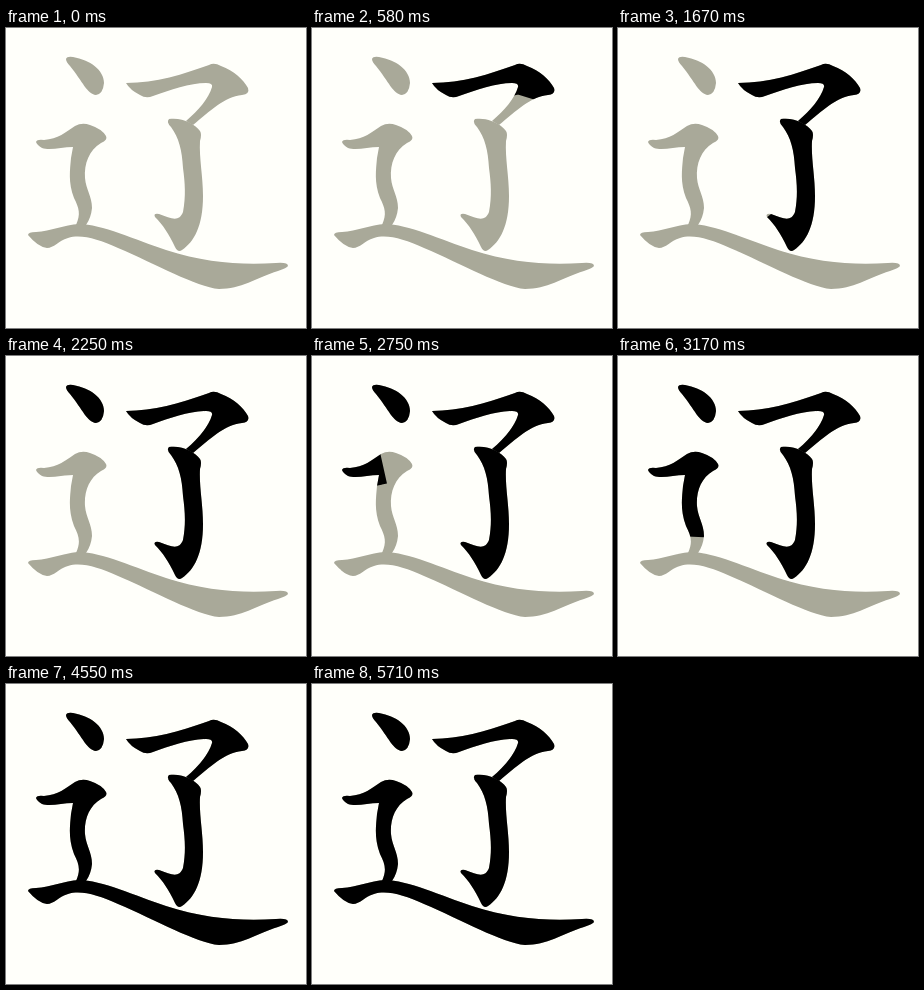
Write an HTML page that moves like this. It is 300 px wide and 300 px high and loops after 5790 ms.

```html
<!DOCTYPE html>
<html lang="zh">
<head>
<meta charset="utf-8">
<title>辽</title>
<style>
html, body { margin: 0; width: 100%; height: 100%; overflow: hidden; background: #fffffa; }
svg { display: block; width: 100vw; height: 100vh; }
.ghost { fill: #a9a999; }
.ink { fill: none; stroke: #000; stroke-linejoin: round; stroke-dasharray: 1 2; stroke-dashoffset: 1.01; }
</style>
</head>
<body>
<svg viewBox="0 0 300 300"></svg>
<script>
const LOOP = 5790;

// Each stroke: outline, brush path, brush width, start and end in ms.
const strokes = [
  {
    shape: 'M120 55C150 55 178 46 203 37Q208 34 215 38C228 43 237 51 242 60Q244 66 236 67C218 69 204 83 187 97L180 93C192 83 203 70 206 59Q207 55 200 55C184 55 164 62 147 68Q140 71 134 67Q124 62 120 55Z',
    brush: 'M119 60L140 56L224 34L213 69L178 101',
    width: 54, from: 0, to: 770
  },
  {
    shape: 'M163 91C176 89 189 96 194 103Q196 106 194 113C193 130 197 148 197 168C197 198 188 214 176 222Q172 225 169 219C163 206 157 197 149 189Q147 185 153 186C166 191 173 194 177 184C180 168 179 155 177 140C176 122 173 110 165 99Q160 94 163 91Z',
    brush: 'M160 89L184 102L187 200L172 216L145 182',
    width: 36, from: 970, to: 1702
  },
  {
    shape: 'M60 31Q61 28 67 29C84 32 98 42 98 55Q97 66 90 67C81 66 77 54 64 38Q60 34 60 31Z',
    brush: 'M58 26L98 72',
    width: 44, from: 2130, to: 2250
  },
  {
    shape: 'M30 114Q31 111 38 112C52 111 60 104 69 98Q76 94 84 97Q96 101 100 108Q102 112 95 115C83 122 78 136 79 150C80 162 86 168 86 180Q85 190 80 197L70 197C75 186 73 180 68 170C62 154 64 142 65 130L67 119C56 119 44 123 36 120Q31 117 30 114Z',
    brush: 'M29 117L66 110L84 106L72 130L72 160L78 176L77 200',
    width: 38, from: 2550, to: 3258
  },
  {
    shape: 'M22 207Q22 204 30 204C45 203 58 197 73 196C95 196 130 212 160 222C200 235 235 237 270 235Q282 234 282 238Q281 240 272 243C250 250 235 261 213 261C190 259 150 236 112 220C92 211 75 206 62 210C52 213 48 220 41 220Q32 219 22 207Z',
    brush: 'M19 211L70 202L215 248L286 236',
    width: 40, from: 3500, to: 4460
  }
];

const svg = document.querySelector('svg');

function add(parent, tag, attrs) {
  const el = document.createElementNS('http://www.w3.org/2000/svg', tag);
  for (const key in attrs) el.setAttribute(key, attrs[key]);
  return parent.appendChild(el);
}

const ghosts = add(svg, 'g', { class: 'ghost' });
const inks = add(svg, 'g', {});

strokes.forEach((s, i) => {
  add(ghosts, 'path', { d: s.shape });
  const clip = add(svg, 'clipPath', { id: 'clip' + i });
  add(clip, 'path', { d: s.shape });
  const group = add(inks, 'g', { 'clip-path': `url(#clip${i})` });
  const ink = add(group, 'path', { class: 'ink', d: s.brush, pathLength: 1, 'stroke-width': s.width });
  ink.animate([
    { strokeDashoffset: 1.01, offset: 0 },
    { strokeDashoffset: 1.01, offset: s.from / LOOP },
    { strokeDashoffset: 0, offset: s.to / LOOP },
    { strokeDashoffset: 0, offset: 1 }
  ], { duration: LOOP, iterations: Infinity });
});
</script>
</body>
</html>
```
